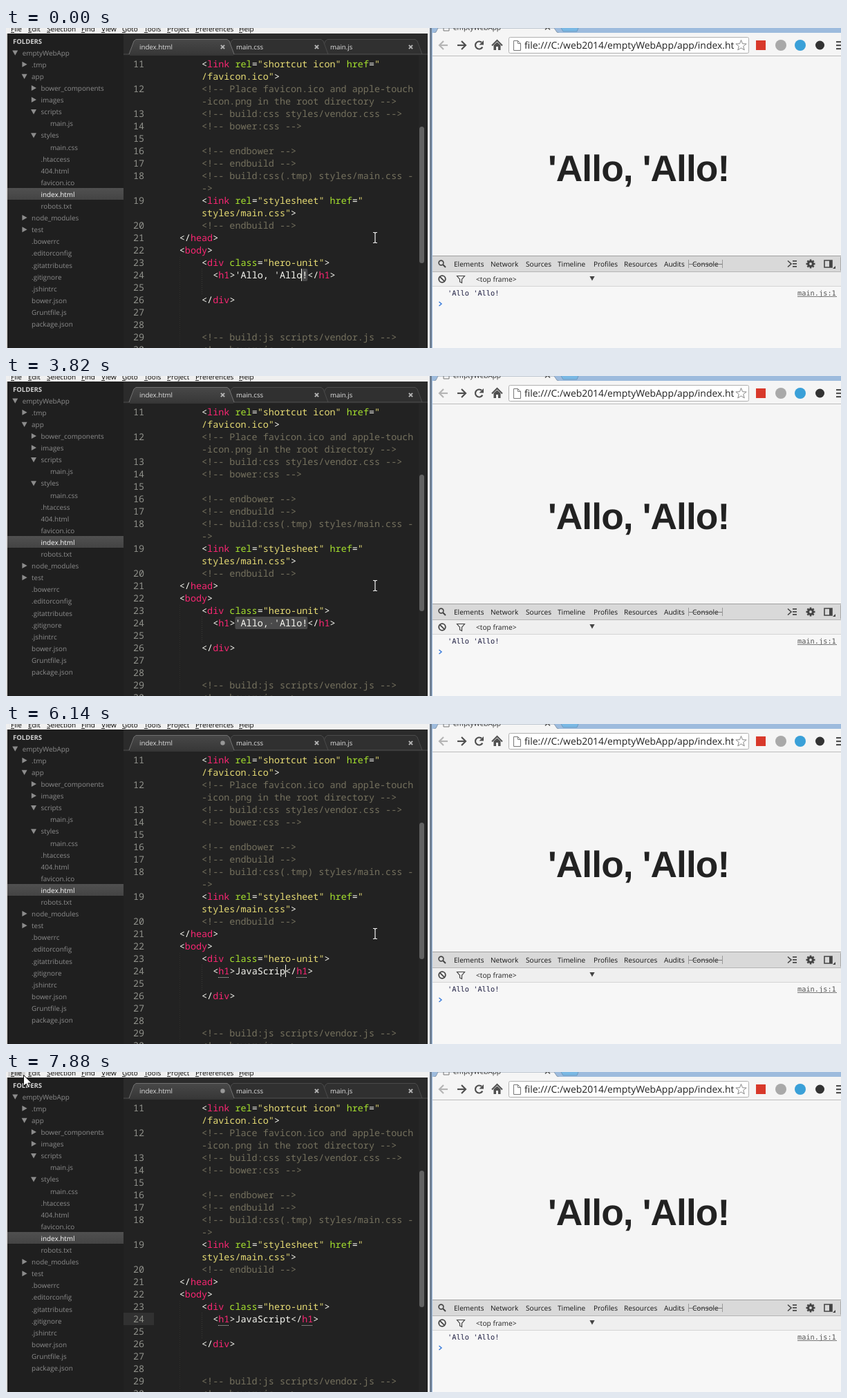
An HTML page with a canvas for the animation above (8 s loop, 1208x464 px).

```html
<!DOCTYPE html>
<html lang="en">
<head>
<meta charset="utf-8">
<title>Editing index.html</title>
<style>
html, body { margin: 0; width: 100%; height: 100%; overflow: hidden; background: #222; }
canvas { display: block; }
</style>
</head>
<body>
<canvas id="stage" width="1208" height="464"></canvas>
<script>
const W = 1208, H = 464, LOOP = 8000;
const UI = '"Open Sans", "Noto Sans", sans-serif';
const MONO = '13.44px "Noto Sans Mono", monospace';
const CELL = 8.064, ROW = 17.97, CODE_X = 250.8, H1_ROW = 17;
const INK = { w: '#f8f8f2', p: '#f92672', g: '#a6e22e', y: '#e6db74', c: '#75715e' };

const screen = document.getElementById('stage').getContext('2d');
const back = document.createElement('canvas');
back.width = W;
back.height = H;
let g = back.getContext('2d');

function rect(x, y, w, h, color) {
  g.fillStyle = color;
  g.fillRect(x, y, w, h);
}

function shade(y0, y1, top, bottom) {
  const fill = g.createLinearGradient(0, y0, 0, y1);
  fill.addColorStop(0, top);
  fill.addColorStop(1, bottom);
  return fill;
}

function text(s, x, y, font, color, align = 'left') {
  g.font = font;
  g.fillStyle = color;
  g.textAlign = align;
  g.textRendering = 'geometricPrecision';
  g.fillText(s, x, y);
}

function path(points, { fill, stroke, width = 1, close = false }) {
  g.beginPath();
  points.forEach(([x, y], i) => i ? g.lineTo(x, y) : g.moveTo(x, y));
  if (close) g.closePath();
  if (fill) { g.fillStyle = fill; g.fill(); }
  if (stroke) { g.strokeStyle = stroke; g.lineWidth = width; g.stroke(); }
}

function arc(x, y, r, { fill, stroke, width = 1, from = 0, to = Math.PI * 2 }) {
  g.beginPath();
  g.arc(x, y, r, from, to);
  if (fill) { g.fillStyle = fill; g.fill(); }
  if (stroke) { g.strokeStyle = stroke; g.lineWidth = width; g.stroke(); }
}

function box(x, y, w, h, r, fill, stroke) {
  g.beginPath();
  g.roundRect(x, y, w, h, r);
  if (fill) { g.fillStyle = fill; g.fill(); }
  if (stroke) { g.strokeStyle = stroke; g.lineWidth = 1; g.stroke(); }
}

function triangle(x, y, r, down, color) {
  const pts = down
    ? [[x - r, y - r * .8], [x + r, y - r * .8], [x, y + r]]
    : [[x - r * .8, y - r], [x + r, y], [x - r * .8, y + r]];
  path(pts, { fill: color, close: true });
}

function cross(x, y, r, color, width = 2) {
  path([[x - r, y - r], [x + r, y + r]], { stroke: color, width });
  path([[x + r, y - r], [x - r, y + r]], { stroke: color, width });
}

// ---- editor window ----

const colX = col => CODE_X + col * CELL;
const rowY = row => 57.3 + row * ROW;

// Runs are split by "|"; the first letter of each is its ink.
function code(runs, col, row) {
  for (const run of runs.split('|')) {
    const s = run.slice(1);
    text(s, colX(col), rowY(row), MONO, INK[run[0]]);
    col += s.length;
  }
  return col;
}

function lineNumber(n, row) {
  text(n, 200, rowY(row), MONO, '#8f908a', 'right');
}

function menuItem(s, x) {
  text(s, x, 4.7, `10px ${UI}`, '#000');
  rect(x, 6, 5, 1, '#222');
}

function drawMenu() {
  rect(0, 0, 612, 8, '#f0f0f0');
  const items = [['File', 7], ['Edit', 32], ['Selection', 59], ['Find', 109], ['View', 138],
    ['Goto', 168], ['Tools', 200], ['Project', 233], ['Preferences', 274], ['Help', 337]];
  for (const [s, x] of items) menuItem(s, x);
}

function drawSidebar() {
  rect(2, 8, 168, 456, '#1f1f1f');
  text('FOLDERS', 10, 22.5, `bold 9.5px ${UI}`, '#d0d0d0');
  // Marks: "v" open folder, ">" closed folder, "." file.
  const tree = ['0vemptyWebApp', '1>.tmp', '1vapp', '2>bower_components', '2>images', '2vscripts',
    '3.main.js', '2vstyles', '3.main.css', '2..htaccess', '2.404.html', '2.favicon.ico',
    '2.index.html', '2.robots.txt', '1>node_modules', '1>test', '1..bowerrc', '1..editorconfig',
    '1..gitattributes', '1..gitignore', '1..jshintrc', '1.bower.json', '1.Gruntfile.js', '1.package.json'];
  tree.forEach((item, i) => {
    const x = 23.7 + 13.4 * item[0], y = 36 + i * 17.1;
    const name = item.slice(2), picked = name === 'index.html';
    if (picked) rect(2, 232, 168, 17, shade(232, 249, '#505050', '#444'));
    if (item[1] !== '.') triangle(x - 10.5, y - .3, 4, item[1] === 'v', '#8c8c8c');
    text(name, x, y + 3.7, `9.9px ${UI}`, picked ? '#fff' : '#8c8c8c');
  });
}

function drawTabs() {
  rect(170, 8, 440, 32, '#2b2b2b');
  rect(170, 37, 440, 3, '#262626');
  const tab = (x, w, fill, edge) => path(
    [[x, 38], [x + 7, 19], [x + 10, 16.5], [x + w - 10, 16.5], [x + w - 7, 19], [x + w, 38]],
    { fill, stroke: edge });
  tab(455, 147, '#303030', '#4a4a4a');
  tab(319, 147, '#303030', '#4a4a4a');
  path([[170, 38], [610, 38]], { stroke: '#505050' });
  tab(178, 152, shade(16, 38, '#484848', '#383838'), '#707070');
  rect(179, 38, 150, 2, '#363636');
  const names = [['index.html', 193], ['main.css', 333], ['main.js', 469]];
  for (const [s, x] of names) text(s, x, 30.7, `9.7px ${UI}`, '#dedede');
  cross(449.5, 27.5, 2.6, '#b4b4b4');
  cross(585.5, 27.5, 2.6, '#b4b4b4');
}

function drawCode() {
  rect(170, 40, 440, 424, '#222');
  g.save();
  g.setLineDash([1, 2]);
  path([[283.5, 349], [283.5, 386]], { stroke: '#3a3a36' });
  path([[251.5, 332], [251.5, 464]], { stroke: '#2e2e2b' });
  g.restore();

  // [column, runs, continues previous line]
  const rows = [
    [4, 'w<|plink|g rel|w=|y"shortcut icon"|g href|w=|y"'],
    [4, 'y/favicon.ico"|w>', true],
    [4, 'c<!-- Place favicon.ico and apple-touch'],
    [4, 'c-icon.png in the root directory -->', true],
    [4, 'c<!-- build:css styles/vendor.css -->'],
    [4, 'c<!-- bower:css -->'],
    [0, 'w'],
    [4, 'c<!-- endbower -->'],
    [4, 'c<!-- endbuild -->'],
    [4, 'c<!-- build:css(.tmp) styles/main.css -'],
    [4, 'c->', true],
    [4, 'w<|plink|g rel|w=|y"stylesheet"|g href|w=|y"'],
    [4, 'ystyles/main.css"|w>', true],
    [4, 'c<!-- endbuild -->'],
    [0, 'w</|phead|w>'],
    [0, 'w<|pbody|w>'],
    [4, 'w<|pdiv|g class|w=|y"hero-unit"|w>'],
    [6, 'w<|ph1|w>'],
    [0, 'w'],
    [4, 'w</|pdiv|w>'],
    [0, 'w'],
    [0, 'w'],
    [4, 'c<!-- build:js scripts/vendor.js -->'],
    [4, 'c<!-- bower:js -->'],
  ];
  let n = 11;
  rows.forEach(([col, runs, wrapped], row) => {
    code(runs, col, row);
    if (!wrapped) lineNumber(n++, row);
  });

  rect(597, 40, 11, 424, '#262626');
  box(598, 143, 7, 198, 3.5, '#626262');
}

// ---- browser window ----

function drawBrowserTop() {
  rect(610, 0, 3, H, '#f0f0f0');
  rect(613, 0, 3, H, '#6f7f92');
  rect(616, 0, 592, H, '#9dbbdd');
  path([[617, 8], [622, 6], [625, 0], [793, 0], [797, 6], [802, 8]], { fill: '#f5f5f5', stroke: '#8799ad' });
  path([[803, 0], [806, 5], [826, 5], [828, 0]], { fill: '#79b8e4', stroke: '#6d9bc0' });
  text('emptyWebApp', 647, 3, `10px ${UI}`, '#333');
  path([[633, 0], [633, 4], [641, 4], [641, 0]], { stroke: '#777' });
  cross(783.5, -1, 3.5, '#555', 1.5);
  rect(617, 7, 591, 33, '#f5f5f5');
  rect(617, 40, 591, 1, '#bdbdbd');

  const arrow = (x, dir, stroke) => {
    const style = { stroke, width: 2.2 };
    path([[x - 6 * dir, 25], [x + 5 * dir, 25]], style);
    path([[x, 19], [x + 6 * dir, 25], [x, 31]], style);
  };
  arrow(633, -1, '#b5b5b5');
  arrow(659, 1, '#505050');

  arc(684.5, 25, 5.5, { stroke: '#505050', width: 2.2, from: .5, to: 5.4 });
  path([[691, 18], [691, 24.5], [684.5, 24.5]], { fill: '#505050', close: true });
  path([[703, 25.5], [710.5, 18], [718, 25.5]], { stroke: '#505050', width: 2 });
  path([[705.5, 25], [710.5, 20.5], [715.5, 25], [715.5, 32], [712, 32], [712, 27], [709, 27], [709, 32], [705.5, 32]],
    { fill: '#505050', close: true });

  box(727.5, 13.5, 347, 23, 2, '#fff', '#b0b0b0');
  path([[734.5, 18.5], [740.5, 18.5], [744.5, 22.5], [744.5, 32.5], [734.5, 32.5]],
    { fill: '#fff', stroke: '#777', close: true });
  path([[740.5, 18.5], [740.5, 22.5], [744.5, 22.5]], { stroke: '#777' });

  g.save();
  g.beginPath();
  g.rect(748, 14, 305, 22);
  g.clip();
  text('file:///C:/web2014/emptyWebApp/app/index.html', 750, 30, `13.9px ${UI}`, '#222');
  g.restore();

  const star = Array.from({ length: 10 }, (_, i) => {
    const a = i * Math.PI / 5 - Math.PI / 2, r = i % 2 ? 3.4 : 8;
    return [1063.5 + r * Math.cos(a), 25.5 + r * Math.sin(a)];
  });
  path(star, { fill: '#fff', stroke: '#888', close: true });

  rect(1085, 18, 14, 14, '#d8392b');
  arc(1121, 25, 8, { fill: '#a9a9a9' });
  arc(1149, 25, 8, { fill: '#3aa0d8' });
  arc(1177.5, 25, 6.5, { fill: '#333' });
  for (const y of [19, 24, 29]) rect(1201, y, 7, 2.2, '#505050');
}

function drawPage() {
  rect(617, 41, 591, 289, '#f5f5f5');
  g.letterSpacing = '-0.9px';
  text("'Allo, 'Allo!", 784, 222.3, 'bold 53.3px "Liberation Sans", Arial, sans-serif', '#222');
  g.letterSpacing = '0px';
}

function drawDevtools() {
  const gray = '#444', bar = '#d9d9d9';
  rect(617, 330, 591, 134, '#f7f7f7');
  rect(617, 330, 591, 1, '#a0a0a0');
  rect(617, 331, 591, 22, bar);
  rect(617, 353, 591, 1, '#b4b4b4');
  rect(617, 354, 591, 20, '#efefef');
  rect(617, 374, 591, 1, '#d4d4d4');

  arc(629.5, 340.5, 3.4, { stroke: gray, width: 1.6 });
  path([[632, 343], [636, 347]], { stroke: gray, width: 2 });

  const panels = [['Elements', 648], ['Network', 701], ['Sources', 752], ['Timeline', 798],
    ['Profiles', 850], ['Resources', 894], ['Audits', 952], ['Console', 993]];
  for (const [s, x] of panels) text(s, x, 345.5, `10.1px ${UI}`, '#151515');
  path([[987, 342.5], [1037, 342.5]], { stroke: '#777' });
  path([[987.5, 336], [987.5, 348]], { stroke: '#999' });
  path([[1036.5, 336], [1036.5, 348]], { stroke: '#999' });

  path([[1131, 337.5], [1136, 342], [1131, 346.5]], { stroke: gray, width: 1.6 });
  for (const y of [337, 341, 345]) rect(1138, y, 6, 1.7, gray);
  for (let i = 0; i < 4; i++) {
    const a = i * Math.PI / 4, dx = 6.5 * Math.cos(a), dy = 6.5 * Math.sin(a);
    path([[1164 - dx, 342 - dy], [1164 + dx, 342 + dy]], { stroke: gray, width: 2.6 });
  }
  arc(1164, 342, 3.4, { fill: bar, stroke: gray, width: 3 });
  path([[1184, 337], [1195, 337], [1195, 347], [1184, 347]], { stroke: gray, width: 1.6, close: true });
  rect(1191, 337, 4, 10, gray);
  path([[1200, 345], [1200, 349], [1196, 349]], { fill: gray, close: true });
  rect(1207, 332, 1, 20, '#a8a8a8');

  arc(631, 364, 4.8, { stroke: gray, width: 1.8 });
  path([[627.6, 360.6], [634.4, 367.4]], { stroke: gray, width: 1.8 });
  path([[652.5, 359.5], [663.5, 359.5], [659.5, 364.5], [659.5, 369.5], [656.5, 368], [656.5, 364.5]],
    { stroke: gray, width: 1.2, close: true });
  text('<top frame>', 680, 367.5, `10.2px ${UI}`, '#222');
  triangle(848, 363, 3.6, true, gray);

  const log = '10.3px "DejaVu Sans Mono", monospace';
  text("'Allo 'Allo!", 639, 387.5, log, '#1c1c40');
  text('main.js:1', 1145, 387.5, log, '#545454');
  rect(1145, 389, 57, 1, '#777');
  path([[626.5, 397], [630, 400], [626.5, 403]], { stroke: '#3b7ddb', width: 1.5 });
}

// ---- moving parts ----

// [time, caret column inside the heading, caret opacity]
const EDIT_AT = 4090;
const caretKeys = [
  [0, 12, 1], [400, 8, 1], [670, 7, 1], [1080, 5, 1], [1350, 1, 1], [1750, 1, .5], [1870, 1, 0],
  [2290, 0, 1], [2690, 0, .5], [2820, 0, 0], [3400, 0, 1], [3820, 0, 0],
  [EDIT_AT, 1, 1], [4340, 2, 1], [4640, 3, 1], [4920, 4, 1], [5190, 5, 1], [5470, 6, 1],
  [5770, 7, 1], [5890, 8, 1], [6140, 9, 1], [6290, 10, 1], [6590, 10, .5], [6750, 10, 0],
  [7180, 10, 1], [7610, 10, .5], [7760, 10, 0],
];

// [time, x, y, shape]
const pointerKeys = [
  [0, 534, 304, 'beam'], [7180, 250, 167, 'beam'], [7310, 185.5, 168, 'arrow'],
  [7460, 36.5, 118, 'arrow'], [7610, 24.5, 39, 'arrow'], [7760, 25.5, 4.5, 'arrow'],
];

const at = (keys, t) => keys.findLast(k => k[0] <= t);

function drawHeading(t) {
  const [, pos, alpha] = at(caretKeys, t);
  const edited = t >= EDIT_AT, start = 10, old = "'Allo, 'Allo!";
  const word = edited ? 'JavaScript'.slice(0, pos) : old;
  const end = start + word.length, top = 349;

  if (!edited) {
    box(colX(start + pos), top, (old.length - pos) * CELL, 18, 2, '#49494a');
    if (pos <= 6) rect(colX(start + 6) + 3.5, 358, 1.5, 1.5, '#8a8a86');
  }
  code(`w${word}</|ph1|w>`, start, H1_ROW);
  if (edited) {
    g.save();
    g.setLineDash([1, 1]);
    for (const col of [7, end + 2]) {
      const x = Math.round(colX(col));
      path([[x, 367.5], [x + 16, 367.5]], { stroke: '#d0d0cc' });
    }
    g.restore();
    arc(313.5, 27.5, 3.2, { fill: '#989898' });
  } else {
    cross(313.5, 27.5, 2.6, '#b4b4b4');
  }
  g.globalAlpha = alpha;
  rect(Math.floor(colX(start + pos)) - (edited ? 0 : 1), top, 1, 18, '#f8f8f0');
  g.globalAlpha = 1;
}

function drawPointer(t) {
  const [, x, y, shape] = at(pointerKeys, t);
  if (shape === 'beam') {
    const ink = { stroke: '#f0f0f0', width: 1.2 };
    path([[x, y - 6.5], [x, y + 6.5]], ink);
    for (const s of [-1, 1]) {
      path([[x - 3, y + 7.5 * s], [x - 1, y + 7.5 * s], [x, y + 6.5 * s], [x + 1, y + 7.5 * s], [x + 3, y + 7.5 * s]], ink);
    }
    return;
  }
  const outline = [[0, 0], [0, 16], [3.7, 12.5], [6.5, 18.5], [9, 17.4], [6.3, 11.6], [11.5, 11.6]];
  path(outline.map(([dx, dy]) => [x + dx, y + dy]), { fill: '#fff', stroke: '#111', close: true });
}

function drawScene(t) {
  g.drawImage(back, 0, 0);
  if (t >= 7180) {
    rect(170, 349, 44, 18, '#313131');
    lineNumber(24, H1_ROW);
  }
  if (t >= 7310 && t < 7460) triangle(208, 321.5, 3.2, true, '#555');
  if (t >= 7760) {
    rect(3, 0, 25, 7, '#d2d2d2');
    menuItem('File', 7);
  }
  drawHeading(t);
  drawPointer(t);
}

rect(0, 0, W, H, '#d8d8d8');
drawSidebar();
drawTabs();
drawCode();
drawMenu();
drawBrowserTop();
drawPage();
drawDevtools();
g = screen;

const began = performance.now();
function tick() {
  drawScene((performance.now() - began) % LOOP);
  requestAnimationFrame(tick);
}
tick();
</script>
</body>
</html>
```
